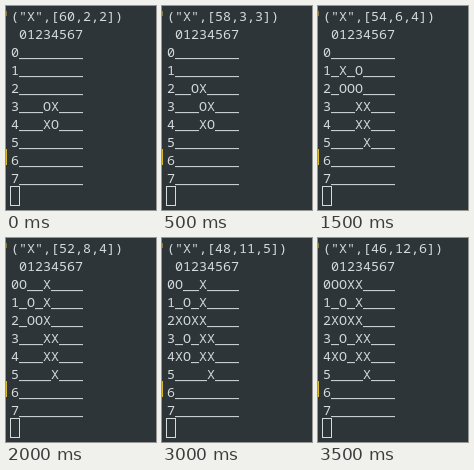
An HTML page that plays this animation: 150 by 204 pixels, repeating every 4 s.

```html
<!DOCTYPE html>
<html lang="en">
<head>
<meta charset="utf-8">
<title>Reversi in a terminal</title>
<style>
  html, body { margin: 0; width: 100%; height: 100%; overflow: hidden; background: #2e3538; }
  pre {
    position: absolute; left: 5px; top: 1px; margin: 0;
    font: 13.333px/18px "Noto Sans Mono", monospace;
    font-variant-ligatures: none;
    color: #d5dadb;
  }
  i { position: absolute; box-sizing: border-box; }
  .cursor { left: 4px; top: 180px; width: 10px; height: 20px; border: 1px solid #d5dadb; }
  .edge { left: 0; top: 143px; width: 1px; height: 16px; background: #d8b820; }
  .speck { left: 0; top: 5px; width: 1px; height: 5px; background: #8a7a3a; }
</style>
</head>
<body>
<pre id="screen"></pre>
<i class="cursor"></i><i class="edge"></i><i class="speck"></i>
<script>
const SIZE = 8, STEP = 500;
// Each round is X's move then O's reply, as row and column.
const rounds = ["23 22", "54 13", "11 21", "03 00", "20 31", "40 41", "02 01"];
const deltas = [-1, 0, 1];

const board = Array.from({ length: SIZE }, () => Array(SIZE).fill("_"));
board[3][3] = board[4][4] = "O";
board[3][4] = board[4][3] = "X";

function play(side, row, col) {
  const other = side === "X" ? "O" : "X";
  board[row][col] = side;
  for (const dr of deltas) for (const dc of deltas) {
    const run = [];
    let r = row + dr, c = col + dc;
    while (board[r]?.[c] === other) {
      run.push([r, c]);
      r += dr;
      c += dc;
    }
    if (board[r]?.[c] === side) run.forEach(([y, x]) => board[y][x] = side);
  }
}

function print() {
  const cells = board.flat();
  const counts = ["_", "X", "O"].map(mark => cells.filter(cell => cell === mark).length);
  const rows = board.map((row, i) => i + row.join(""));
  return [`("X",[${counts}])`, " 01234567", ...rows].join("\n");
}

const screens = [print()];
for (const round of rounds) {
  round.split(" ").forEach((move, i) => play("XO"[i], +move[0], +move[1]));
  screens.push(print());
}

const screen = document.getElementById("screen");
const start = performance.now();
function draw() {
  const step = Math.floor((performance.now() - start) / STEP) % screens.length;
  if (screen.textContent !== screens[step]) screen.textContent = screens[step];
  requestAnimationFrame(draw);
}
draw();
</script>
</body>
</html>
```
